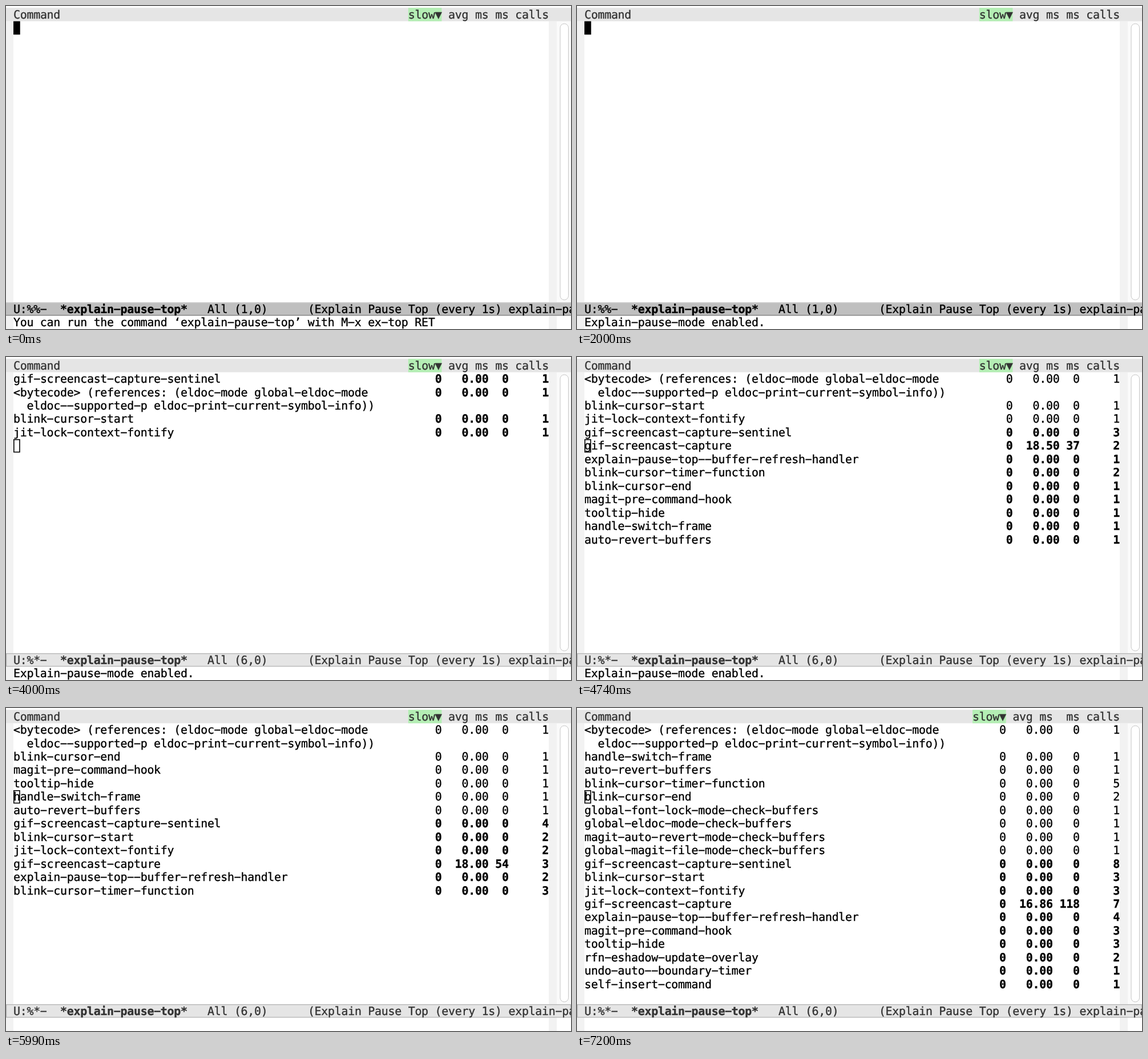
An HTML page that plays this animation: 990 px wide and 566 px high, repeating every 8000 ms.

```html
<!DOCTYPE html>
<html lang="en">
<head>
<meta charset="utf-8">
<title>explain-pause-top</title>
<style>
  html, body { margin: 0; width: 100%; height: 100%; overflow: hidden; background: #fff; }
  svg { display: block; width: 990px; height: 566px; }
  text {
    font: 19.93px "DejaVu Sans Mono", monospace;
    letter-spacing: -.274px;
    text-rendering: geometricPrecision;
    white-space: pre;
    stroke-width: .35px;
    /* An invisible turn keeps baselines from snapping to whole pixels. */
    transform: rotate(.001deg);
  }
  .bold { font-weight: bold; }
</style>
</head>
<body>
<svg id="stage" viewBox="0 0 990 566"></svg>
<script>
const LOOP = 8000;
const LEFT = 13, TOP = 26.7, CELL = 11.725, LINE = 23.45, BASELINE = 18.4;
const MODE_ROW = 21, ECHO_ROW = 22, CURSOR_ROW = 5;
const DARK = '#333';

const BYTECODE = [
  '<bytecode> (references: (eldoc-mode global-eldoc-mode',
  '  eldoc--supported-p eldoc-print-current-symbol-info))'
];

// Each entry is "command calls"; fresh entries get bold figures.
const tables = [
  { stale: [], fresh: [] },
  {
    stale: [],
    fresh: ['gif-screencast-capture-sentinel 1', 'bytecode 1', 'blink-cursor-start 1',
      'jit-lock-context-fontify 1']
  },
  {
    stale: ['bytecode 1', 'blink-cursor-start 1', 'jit-lock-context-fontify 1'],
    fresh: ['gif-screencast-capture-sentinel 3', 'gif-screencast-capture 2',
      'explain-pause-top--buffer-refresh-handler 1', 'blink-cursor-timer-function 2',
      'blink-cursor-end 1', 'magit-pre-command-hook 1', 'tooltip-hide 1',
      'handle-switch-frame 1', 'auto-revert-buffers 1'],
    captureMs: 37
  },
  {
    stale: ['bytecode 1', 'blink-cursor-end 1', 'magit-pre-command-hook 1', 'tooltip-hide 1',
      'handle-switch-frame 1', 'auto-revert-buffers 1'],
    fresh: ['gif-screencast-capture-sentinel 4', 'blink-cursor-start 2',
      'jit-lock-context-fontify 2', 'gif-screencast-capture 3',
      'explain-pause-top--buffer-refresh-handler 2', 'blink-cursor-timer-function 3'],
    captureMs: 54
  },
  {
    stale: ['bytecode 1', 'handle-switch-frame 1', 'auto-revert-buffers 1',
      'blink-cursor-start 2', 'jit-lock-context-fontify 2'],
    fresh: ['gif-screencast-capture-sentinel 5', 'gif-screencast-capture 5',
      'explain-pause-top--buffer-refresh-handler 3', 'blink-cursor-timer-function 5',
      'blink-cursor-end 2', 'magit-pre-command-hook 2', 'tooltip-hide 2',
      'rfn-eshadow-update-overlay 1', 'global-font-lock-mode-check-buffers 1',
      'global-eldoc-mode-check-buffers 1', 'magit-auto-revert-mode-check-buffers 1',
      'global-magit-file-mode-check-buffers 1'],
    captureMs: 87
  },
  {
    stale: ['bytecode 1', 'handle-switch-frame 1', 'auto-revert-buffers 1',
      'blink-cursor-timer-function 5', 'blink-cursor-end 2',
      'global-font-lock-mode-check-buffers 1', 'global-eldoc-mode-check-buffers 1',
      'magit-auto-revert-mode-check-buffers 1', 'global-magit-file-mode-check-buffers 1'],
    fresh: ['gif-screencast-capture-sentinel 8', 'blink-cursor-start 3',
      'jit-lock-context-fontify 3', 'gif-screencast-capture 7',
      'explain-pause-top--buffer-refresh-handler 4', 'magit-pre-command-hook 3',
      'tooltip-hide 3', 'rfn-eshadow-update-overlay 2', 'undo-auto--boundary-timer 1',
      'self-insert-command 1'],
    captureMs: 118
  }
];

const HINT = 'You can run the command ‘explain-pause-top’ with M-x ex-top RET';
const ENABLED = 'Explain-pause-mode enabled.';
const scenes = [
  { at: 0, table: 0, focused: true, echo: HINT },
  { at: 2000, table: 0, focused: true, echo: ENABLED },
  { at: 3000, table: 1, focused: true, echo: ENABLED },
  { at: 4000, table: 1, focused: false, echo: ENABLED },
  { at: 4740, table: 2, focused: false, echo: ENABLED },
  { at: 4990, table: 3, focused: false, echo: ENABLED },
  { at: 5990, table: 3, focused: false, echo: '' },
  { at: 6900, table: 4, focused: false, echo: '' },
  { at: 7200, table: 5, focused: false, echo: '' }
];

const rowTop = row => TOP + row * LINE;
const colX = col => LEFT + col * CELL;

const rect = (x, y, w, h, fill, extra = '') =>
  `<rect x="${x}" y="${y}" width="${w}" height="${h}" fill="${fill}" ${extra}/>`;

// Hyphens are drawn with the wider minus glyph.
function text(row, col, string, { fill = '#000', bold = false } = {}) {
  const glyphs = string.replace(/-/g, '\u2212').replace(/</g, '&lt;');
  return `<text x="${colX(col)}" y="${rowTop(row) + BASELINE}" fill="${fill}" stroke="${fill}"` +
    `${bold ? ' class="bold"' : ''}>${glyphs}</text>`;
}

const textEnd = (row, col, string, style) => text(row, col - string.length, string, style);

function chrome() {
  const height = MODE_ROW * LINE;
  return rect(0, TOP, LEFT, 566, '#f2f2f2') +
    rect(951, TOP, 14, 566, '#f2f2f2') +
    rect(965, TOP, 25, height, '#fafafa') +
    rect(971, 31, 14.5, 484, '#fff', 'rx="7.2" stroke="#c6c6c6"');
}

function header(shift) {
  const style = { fill: DARK };
  return rect(0, 3.2, 990, TOP - 3.2, '#e5e5e5') +
    rect(colX(59 - shift), 3.2, 5 * CELL, TOP - 3.2, '#b4eeb4') +
    text(-1, 0, 'Command', style) + text(-1, 59 - shift, 'slow▼', style) +
    text(-1, 65 - shift, 'avg ms', style) + text(-1, 72, 'ms', style) +
    text(-1, 75, 'calls', style);
}

function tableRows({ stale, fresh, captureMs = 0 }, shift) {
  let row = 0, out = '';
  [...stale, ...fresh].forEach((entry, i) => {
    const [name, calls] = entry.split(' ');
    const style = { bold: i >= stale.length };
    const ms = name === 'gif-screencast-capture' ? captureMs : 0;
    const lines = name === 'bytecode' ? BYTECODE : [name];
    lines.forEach((line, n) => { out += text(row + n, 0, line); });
    out += textEnd(row, 64 - shift, '0', style) +
      textEnd(row, 71 - shift, (ms / calls).toFixed(2), style) +
      textEnd(row, 74, String(ms), style) + textEnd(row, 80, calls, style);
    row += lines.length;
  });
  return out;
}

function cursor(row, focused) {
  return focused
    ? rect(LEFT, rowTop(row), CELL, LINE, '#000')
    : rect(LEFT + .8, rowTop(row) + .8, CELL - 1.6, LINE - 1.6, 'none',
        'stroke="#000" stroke-width="1.6"');
}

function modeLine(focused, filled) {
  const y = rowTop(MODE_ROW), style = { fill: focused ? '#000' : DARK };
  const bar = focused
    ? rect(0, y, 990, LINE, '#bfbfbf') + rect(0, y, 990, 1.2, '#d4d4d4') +
      rect(0, y + LINE - 1.2, 990, 1.2, '#7f7f7f')
    : rect(.6, y + .6, 988.8, LINE - 1.2, '#e5e5e5', 'stroke="#b0b0b0" stroke-width="1.2"');
  return bar + text(MODE_ROW, 0, filled ? 'U:%*-' : 'U:%%-', style) +
    text(MODE_ROW, 7, '*explain-pause-top*', { ...style, bold: true }) +
    text(MODE_ROW, 29, filled ? 'All (6,0)' : 'All (1,0)', style) +
    text(MODE_ROW, 44, '(Explain Pause Top (every 1s) explain-pause', style);
}

function render({ table, focused, echo }) {
  const data = tables[table], filled = table > 0;
  const shift = data.captureMs > 99 ? 1 : 0;
  return chrome() + header(shift) + tableRows(data, shift) +
    cursor(filled ? CURSOR_ROW : 0, focused) + modeLine(focused, filled) +
    text(ECHO_ROW, 0, echo);
}

const stage = document.getElementById('stage');
let shown;
function tick() {
  const time = performance.now() % LOOP;
  const scene = scenes.findLast(s => s.at <= time);
  if (scene !== shown) {
    stage.innerHTML = render(scene);
    shown = scene;
  }
  requestAnimationFrame(tick);
}
tick();
</script>
</body>
</html>
```
